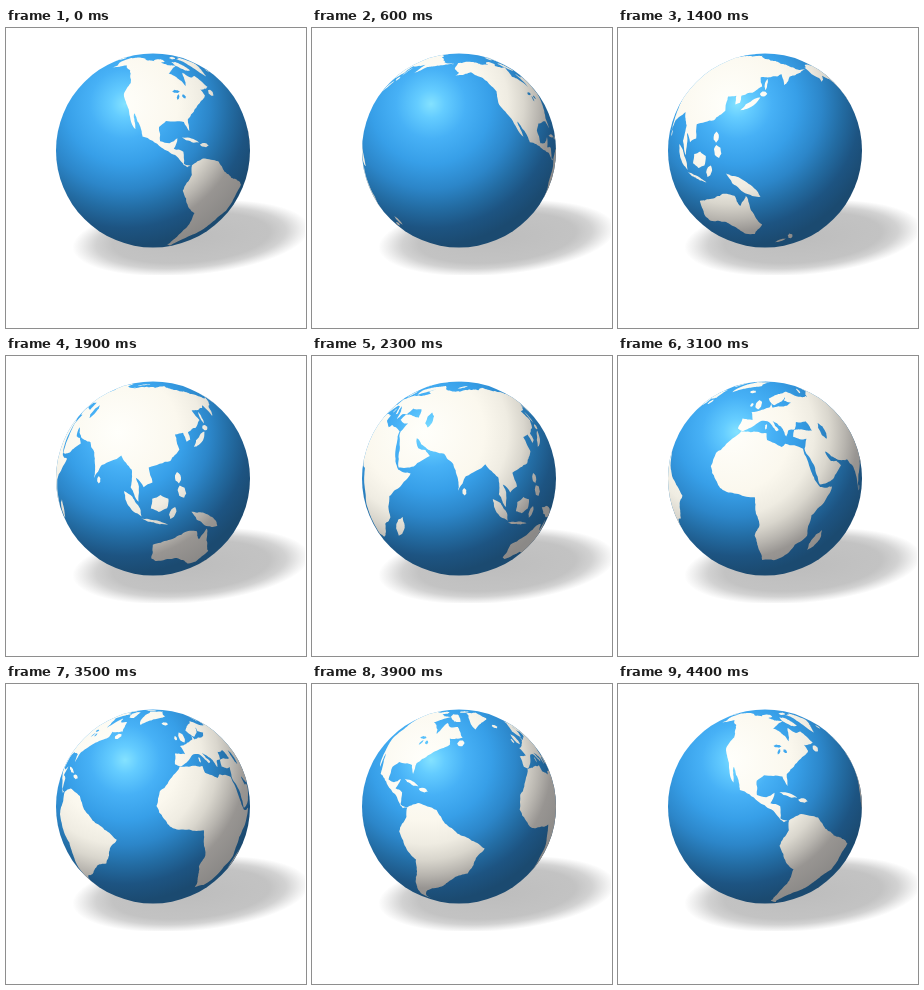
Recreate the animation shown at these times as an HTML page with a canvas. Size 300 by 300 pixels, loop 4500 ms.

```html
<!DOCTYPE html>
<html lang="en">
<head>
<meta charset="utf-8">
<title>Spinning globe</title>
<style>
html, body { margin: 0; width: 100%; height: 100%; overflow: hidden; background: #fff; }
canvas { display: block; width: 300px; height: 300px; }
</style>
</head>
<body>
<canvas id="stage" width="300" height="300"></canvas>
<script>
const ctx = document.getElementById('stage').getContext('2d');
const CX = 147, CY = 122.5, R = 97;
const STEP_MS = 100, STEPS = 45, START_LON = -99;
const RAD = Math.PI / 180;
const TILT = 14 * RAD, ROLL = 8 * RAD;
const EYE = 5.5; // camera distance in globe radii
const LENS = Math.sqrt(EYE * EYE - 1);

// Key capes and bays as longitude, latitude; roughen() draws the coast between them
const northAmerica = [
  -166,68, -156,71, -128,70, -95,68, -82,69, -94,60, -82,55, -79,51.5, -78,62, -70,58.5,
  -64,60, -56,52, -66,50, -64,46, -70,42, -76,37, -81,31.5, -80.3,25.5, -83.5,30, -94,29.5,
  -97.5,26, -96,19, -91,18.6, -87,21.4, -88.5,16, -83.3,15, -82.5,9, -77.5,8.5, -80.5,7.4,
  -87.5,13, -95,16, -105.5,20, -113,31, -110,23, -117,32.5, -124.2,40, -124,48, -134,57,
  -146,60.5, -160,55.5, -158,58.6, -165,62
];
const southAmerica = [
  -78,8.5, -72,12, -62,10.5, -50,0.5, -35,-6, -39,-14, -41,-22, -48,-26, -57,-36.5, -65,-42,
  -69,-51, -66,-55, -74,-51, -73.5,-40, -70.5,-18.5, -76,-14, -81,-5, -77.5,3.5
];
const europeArabia = [
  60,68, 40,67, 28,71, 13,66, 5,61, 8,58, 12,56, 19,60, 24,65.5, 21.5,61, 29,60, 21,56,
  11,54, 9,57, 8.5,54, -1,49.5, -4.7,48.4, -1.5,43.5, -9,43.3, -9,37, -5.6,36, 0,39.5,
  4,43.4, 9,44.3, 16,39, 17.5,40, 12.5,45, 19,42, 22.5,36.7, 24,40.5, 28.5,41.5, 30,46,
  38,47, 41.5,41.5, 28,41, 27,37, 36,36.5, 34,31, 35,28.5, 43,13, 52,15.6, 59.5,22.5,
  56,25, 51.5,25, 48,30, 57,25.7, 61,25.4
];
const asia = [
  50,66, 54,40, 54,28, 57,25.7, 67,25, 73,20.5, 77.5,8, 80.3,15.5, 90,22.5, 97.5,16.5,
  98.5,8, 103.5,1.5, 100.3,13, 105,9, 109,12, 106,19, 117,23.7, 121.8,30, 119,38, 124.5,39.5,
  126.5,34.5, 129,36, 128,40, 140,48, 136,54.5, 155,59.3, 157,51, 163,58, 178,62.5, 190,66,
  160,69.7, 140,72.5, 104,77.5, 73,72
];
const africa = [
  -6,35.8, 10,37.2, 11,33.5, 20,30.8, 22,32.7, 33,31, 37.3,20, 43.2,11.8, 51.2,11.8, 40,-3,
  40.6,-15, 35,-21, 31,-30, 26,-33.8, 18.5,-34.5, 11.8,-17, 13.5,-10, 9.3,4, -7.6,4.4,
  -17.3,14.5, -16.5,22, -9.8,31
];
const australia = [
  142.5,-10.8, 146,-19, 153.4,-28, 150,-37.5, 144,-38.7, 137,-34, 131,-31.5, 118,-35,
  115,-33, 114,-22, 122,-18, 130,-12.5, 136.5,-12, 140,-17.5
];
const greenland = [-70,78, -35,83.5, -20,74, -40,65, -45,60, -53,68, -58,75];

// Slim islands and lakes: from one end to the other, then the width in degrees
const islands = [
  [49.5,-12, 45,-25.5, 5],     // Madagascar
  [131,-1, 150,-10, 5],        // New Guinea
  [110,-1, 118,5, 8],          // Borneo
  [95.5,5.5, 106,-6, 4],       // Sumatra
  [105.5,-7, 120,-8.7, 1.4],   // Java
  [120.5,-5.5, 122,1, 3],      // Sulawesi
  [121,18.5, 122.5,13, 3],     // Philippines
  [123,12, 126,6, 4],
  [131,32, 141,41, 3],         // Japan
  [140,43, 145,44, 3],
  [142.3,54, 143,46, 2],
  [173,-35, 177.5,-41, 3],     // New Zealand
  [173.5,-41, 167,-46, 3],
  [80.2,9.7, 81,6, 2],         // Sri Lanka
  [-3.5,58.5, -0.5,51, 5],     // Britain
  [-9,53, -6.5,54, 3],
  [-23,65, -14.5,64.8, 3],     // Iceland
  [-88,73, -64,65, 6],         // Arctic islands
  [-120,72, -100,72, 5],
  [-90,79, -65,82, 5],
  [53,71, 67,77, 2.5],
  [-59,47.5, -53.5,48.5, 4],
  [-84.5,22, -74.5,20, 1.6],   // Cuba
  [-74,19, -68.5,18.6, 2],
  [8.8,42.5, 9,39, 1.2]
];
const lakes = [
  [49,46.5, 52,37, 5],         // Caspian
  [-91,47, -85,47.3, 2],
  [-87.3,42, -86,45.5, 1.6],
  [-83.5,45.5, -81,43.5, 2]
];

let seed = 7;
function random() {
  seed = (seed * 16807) % 2147483647;
  return seed / 2147483647;
}

// Halve an edge again and again, nudging each middle sideways
function roughen([ax, ay], [bx, by]) {
  const dx = bx - ax, dy = by - ay;
  if (Math.hypot(dx, dy) < 1.6) return [[ax, ay]];
  const push = .16 * (random() - .5);
  const mid = [(ax + bx) / 2 - dy * push, (ay + by) / 2 + dx * push];
  return [...roughen([ax, ay], mid), ...roughen(mid, [bx, by])];
}

function coast(keys) {
  const pts = [];
  for (let i = 0; i < keys.length; i += 2) pts.push([keys[i], keys[i + 1]]);
  return pts
    .flatMap((p, i) => roughen(p, pts[(i + 1) % pts.length]))
    .map(p => p.map(v => v * RAD));
}

function isle([ax, ay, bx, by, width]) {
  const dx = bx - ax, dy = by - ay, half = width / 2 / Math.hypot(dx, dy);
  const at = (along, side) => [
    ax + dx * along - dy * half * side,
    ay + dy * along + dx * half * side
  ];
  return coast([at(0, 0), at(.3, 1), at(.75, .9), at(1, 0), at(.7, -1), at(.25, -.9)].flat());
}

const land = [
  ...[northAmerica, southAmerica, europeArabia, asia, africa, australia, greenland].map(coast),
  ...islands.map(isle)
];
const water = lakes.map(isle);

// Stops are given in pixels from the centre
function radial(x, y, r, stops) {
  const g = ctx.createRadialGradient(x, y, 0, x, y, r);
  stops.forEach(([at, color]) => g.addColorStop(at / r, color));
  return g;
}

const ocean = radial(119, 76, 150, [[0, '#84e2ff'], [14, '#64ccff'], [35, '#47b1f6'],
  [60, '#379fe8'], [85, '#2c86c9'], [105, '#236ca3'], [124, '#1d5482'], [142, '#1b4a70']]);
const ground = radial(112, 76, 150, [[0, '#fffffb'], [60, '#fbf8ee'], [84, '#efece2'],
  [100, '#d9d6cd'], [115, '#b8b5af'], [128, '#989592'], [150, '#8b8987']]);
const shade = radial(0, 0, 1, [[0, '#bdbdbd'], [.66, '#c3c3c3'], [.8, '#d2d2d2'],
  [.92, '#eee'], [1, '#fff']]);

function project(lon, lat, mid) {
  const c = Math.cos(lat), s = Math.sin(lat);
  const x = c * Math.sin(lon - mid), depth = c * Math.cos(lon - mid);
  const y = Math.sin(TILT) * depth - Math.cos(TILT) * s;
  const z = Math.sin(TILT) * s + Math.cos(TILT) * depth;
  const seen = z > 1 / EYE;
  // Hidden points slide just outside the rim
  const k = R * (seen ? LENS / (EYE - z) : 1.1 / Math.hypot(x, y));
  return {
    x: CX + k * (x * Math.cos(ROLL) - y * Math.sin(ROLL)),
    y: CY + k * (x * Math.sin(ROLL) + y * Math.cos(ROLL)),
    seen
  };
}

function fillRings(rings, mid, paint) {
  ctx.fillStyle = paint;
  for (const ring of rings) {
    const pts = ring.map(([lon, lat]) => project(lon, lat, mid));
    if (!pts.some(p => p.seen)) continue;
    ctx.beginPath();
    pts.forEach(p => ctx.lineTo(p.x, p.y));
    ctx.fill();
  }
}

function disc(x, y, r, paint) {
  ctx.beginPath();
  ctx.arc(x, y, r, 0, 2 * Math.PI);
  ctx.fillStyle = paint;
  ctx.fill();
}

function drawShadow() {
  ctx.save();
  ctx.beginPath();
  ctx.rect(0, 0, 299, 247);
  ctx.clip();
  ctx.translate(185, 210);
  ctx.rotate(-5 * RAD);
  ctx.scale(119, 37);
  disc(0, 0, 1, shade);
  ctx.restore();
}

function draw(step) {
  const mid = (START_LON - step * 360 / STEPS) * RAD;
  ctx.fillStyle = '#fff';
  ctx.fillRect(0, 0, 300, 300);
  drawShadow();
  ctx.save();
  disc(CX, CY, R, ocean);
  ctx.clip();
  fillRings(land, mid, ground);
  fillRings(water, mid, ocean);
  ctx.restore();
}

const start = performance.now();
let shown = -1;
function tick() {
  const step = Math.floor((performance.now() - start) / STEP_MS) % STEPS;
  if (step !== shown) draw(shown = step);
  requestAnimationFrame(tick);
}
tick();
</script>
</body>
</html>
```
